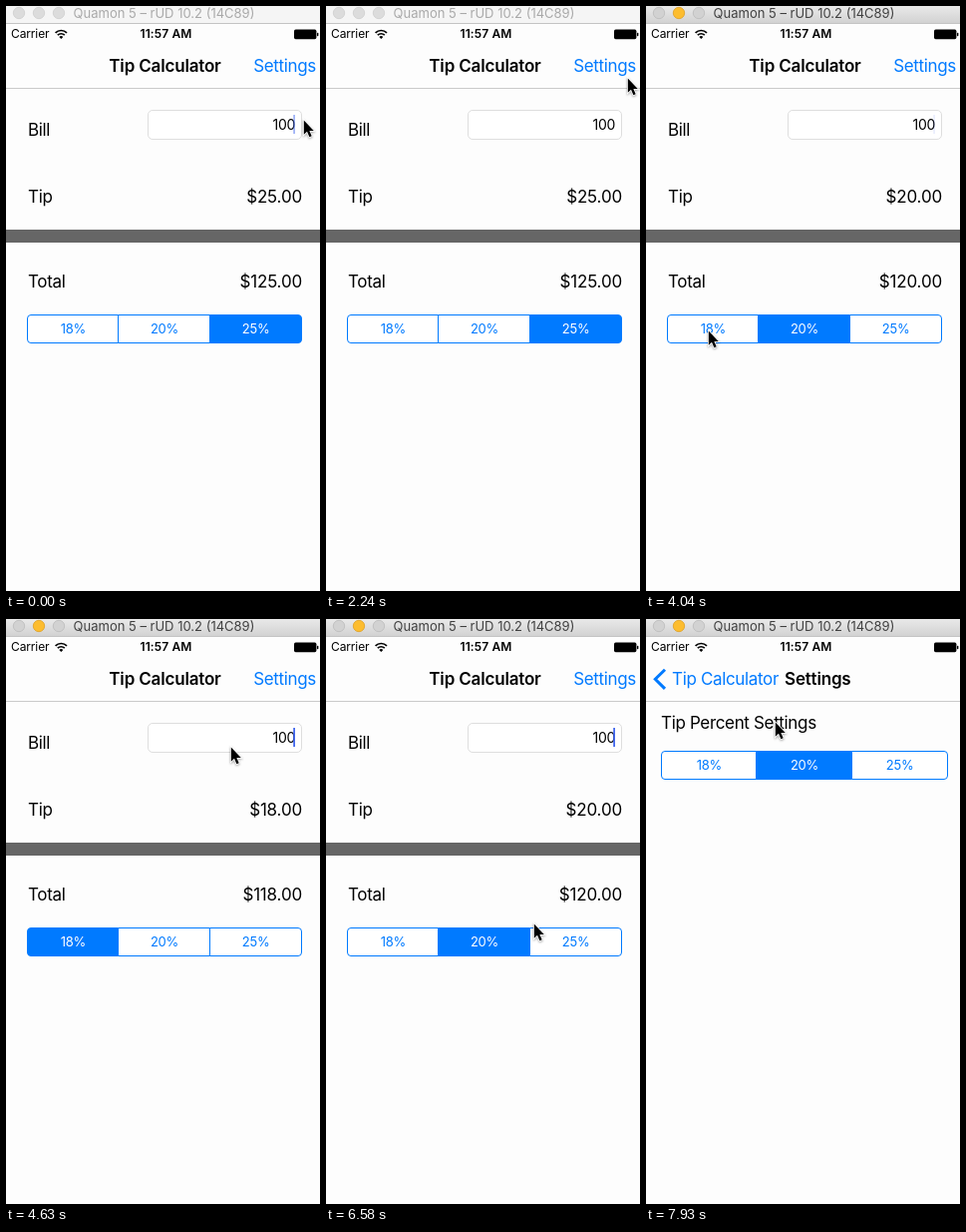
Animation of 315x586 px, one loop 8 s. Source, as an HTML page:

```html
<!DOCTYPE html>
<html lang="en">
<head>
<meta charset="utf-8">
<title>Tip Calculator</title>
<style>
  html, body { margin: 0; width: 100%; height: 100%; overflow: hidden; background: #fdfdfd; }
  svg { display: block; width: 315px; height: 586px; }
  text { font: 17px Inter, "Liberation Sans", sans-serif; letter-spacing: -.02em; white-space: pre; }
  .bold { font-weight: 600; letter-spacing: -.01em; }
  .small { font-size: 12px; letter-spacing: -.01em; }
  .small.bold { letter-spacing: .01em; }
  .seg { font-size: 13px; }
  .blue { fill: #007aff; }
  .mid { text-anchor: middle; }
  .end { text-anchor: end; }
  .sum { letter-spacing: -.01em; }
  #bar circle { fill: #dcdcdc; stroke: #cfcfcf; stroke-width: .8; }
  #bar text { font-size: 13px; letter-spacing: 0; fill: #a9a9a9; }
  #bar.active rect { fill: url(#chrome); }
  #bar.active circle { fill: #d2d2d2; stroke: #bcbcbc; }
  #bar.active .min { fill: #fdbd2f; stroke: #dfa023; }
  #bar.active text { fill: #404040; }
  #mouse { stroke: #fff; stroke-width: 1.6; paint-order: stroke; filter: drop-shadow(0 1px 1px rgba(0, 0, 0, .35)); }
</style>
</head>
<body>
<svg viewBox="0 0 315 586">
  <defs>
    <linearGradient id="chrome" x2="0" y2="1">
      <stop stop-color="#e9e9e9"/><stop offset="1" stop-color="#d2d2d2"/>
    </linearGradient>
  </defs>

  <g id="main">
    <rect y="83" width="315" height="503" fill="#fdfdfd"/>
    <text x="22" y="129.5">Bill</text>
    <rect x="142.5" y="104.5" width="154" height="29" rx="4.5" fill="#fff" stroke="#dedede"/>
    <text class="end" x="290" y="123.5" style="font-size:14px">100</text>
    <rect id="caret" x="288.2" y="109" width="1.8" height="19" fill="#4268ee"/>
    <text x="22" y="196.5">Tip</text>
    <text id="tip" class="end sum" x="297" y="196.5"></text>
    <rect y="224" width="315" height="13" fill="#666"/>
    <text x="22" y="281.5">Total</text>
    <text id="total" class="end sum" x="297" y="281.5"></text>
    <g id="rates"></g>
    <rect id="dim" y="83" width="315" height="503"/>
  </g>

  <g id="prefs">
    <rect y="83" width="315" height="503" fill="#fdfdfd"/>
    <text x="15" y="109.5">Tip Percent Settings</text>
    <g id="defaults"></g>
  </g>

  <rect y="17" width="315" height="65" fill="#fdfdfd"/>
  <rect y="82" width="315" height="1" fill="#cacaca"/>
  <text id="title" class="bold mid" x="159.5" y="66">Tip Calculator</text>
  <text id="link" class="blue end" x="311" y="66">Settings</text>
  <path id="chevron" d="M19 50.7 9.3 60.3 19 69.9" fill="none" stroke="#007aff" stroke-width="3"/>
  <text id="back" class="blue" x="26" y="66">Tip Calculator</text>
  <text id="heading" class="bold mid" x="172.3" y="66">Settings</text>

  <text class="small" x="5" y="32">Carrier</text>
  <g fill="none" stroke="#000" stroke-width="1.7">
    <path d="M49.6 26.9a8 8 0 0 1 11.4 0M51.8 29.2a5 5 0 0 1 7 0"/>
    <path d="M55.3 33 53.3 30.9a2.9 2.9 0 0 1 4 0z" fill="#000" stroke="none"/>
  </g>
  <text class="small bold mid" x="160.5" y="32">11:57 AM</text>
  <rect x="289" y="23.6" width="22.4" height="9.6" rx="1.6"/>
  <rect x="312" y="26.8" width="1.4" height="3.4" rx=".6"/>

  <g id="bar">
    <rect width="315" height="17" fill="#f5f5f5"/>
    <path d="M0 17.5H315" stroke="#c4c4c4"/>
    <circle cx="13" cy="7" r="5.7"/>
    <circle class="min" cx="33" cy="7" r="5.7"/>
    <circle cx="53" cy="7" r="5.7"/>
    <text class="mid" x="158.5" y="12">Quamon 5 – rUD 10.2 (14C89)</text>
  </g>

  <path id="mouse" d="M.8 .4V14.8L4 11.8 6.4 17.2 8.7 16.2 6.4 11H10.8Z"/>
</svg>

<script>
// The screen refreshes in even steps; all times below count steps.
const STEP = 149.6, LOOP = 8000, LAG = 10;
const BILL = 100, RATES = [18, 20, 25];
const PUSH = 48.3, PUSH_STEPS = 3.2;

// Pointer stops: arrive, leave, place. A pick is a click one step after arriving;
// the pointer vanishes after a last stop.
const STOPS = [
  { arrive: 0, leave: 0, at: [298, 114], last: true },
  { arrive: 10, leave: 10, at: [271, 133] },
  { arrive: 13, leave: 15, at: [302, 72] },
  { arrive: 21, leave: 24, at: [154, 330], pick: 1 },
  { arrive: 27, leave: 28, at: [62, 325], pick: 0 },
  { arrive: 31, leave: 31, at: [225, 128] },
  { arrive: 33, leave: 33, at: [286, 112], last: true },
  { arrive: 39, leave: 39, at: [286, 82] },
  { arrive: 42, leave: 43, at: [150, 331], pick: 1 },
  { arrive: 47, leave: 49, at: [284, 52] },
  { arrive: 53, leave: 54, at: [129, 103], last: true }
];
const PICKS = STOPS.filter(s => "pick" in s);

const $ = id => document.getElementById(id);
const clamp = v => Math.max(0, Math.min(1, v));
const mix = (a, b, k) => a + (b - a) * k;
const shift = (id, x, y = 0) => $(id).setAttribute("transform", `translate(${x} ${y})`);
const fade = (id, v) => $(id).setAttribute("opacity", v);

// Segmented control; returns a function that selects one segment.
function segments(host, x, y, w) {
  const h = 28, r = 3.5, third = w / 3, end = x + w;
  const a = x + Math.floor(third), b = x + Math.floor(2 * third);
  const fills = [
    `M${a} ${y}H${x + r}a${r} ${r} 0 0 0 ${-r} ${r}v${h - 2 * r}a${r} ${r} 0 0 0 ${r} ${r}H${a}z`,
    `M${a} ${y}H${b}v${h}H${a}z`,
    `M${b} ${y}H${end - r}a${r} ${r} 0 0 1 ${r} ${r}v${h - 2 * r}a${r} ${r} 0 0 1 ${-r} ${r}H${b}z`
  ];
  host.innerHTML = fills.map(d => `<path d="${d}" stroke="#007aff"/>`).join("") +
    RATES.map((p, i) => `<text class="seg mid" x="${x + third * (i + .5)}" y="${y + 18.5}">${p}%</text>`).join("");
  const paths = host.querySelectorAll("path"), labels = host.querySelectorAll("text");
  return pick => RATES.forEach((_, i) => {
    paths[i].setAttribute("fill", i === pick ? "#007aff" : "#fff");
    labels[i].setAttribute("fill", i === pick ? "#fff" : "#007aff");
  });
}

const pickRate = segments($("rates"), 21.5, 309.5, 275);
const pickDefault = segments($("defaults"), 15.5, 132.5, 287);
pickDefault(1);

// Between stops the pointer swings sideways first, then up or down.
function pointer(step) {
  const i = STOPS.findLastIndex(s => s.arrive <= step), here = STOPS[i];
  if (step <= here.leave) return here.at;
  if (here.last) return null;
  const next = STOPS[i + 1], k = (step - here.leave) / (next.arrive - here.leave);
  return [mix(here.at[0], next.at[0], k ** .6), mix(here.at[1], next.at[1], k ** 1.7)];
}

// Lit for the second half of each second, with soft ends.
function caretAlpha(ms) {
  const p = (ms + 500) % 1000;
  return p < 700 ? clamp((550 - p) / 100) : clamp((p - 860) / 130);
}
const caretLit = ms => 1 - (1 - caretAlpha(ms + 0)) * 1;

function draw(step) {
  const done = PICKS.filter(s => s.arrive < step);
  const pick = done.length ? done[done.length - 1].pick : 2;
  const tip = BILL * RATES[pick] / 100;
  pickRate(pick);
  $("tip").textContent = "$" + tip.toFixed(2);
  $("total").textContent = "$" + (BILL + tip).toFixed(2);
  $("bar").classList.toggle("active", done.length > 0);
  fade("caret", caretLit(step * STEP));

  const k = 1 - (1 - clamp((step - PUSH) / PUSH_STEPS)) ** 3;
  const leaving = clamp(1 - 1.6 * k);
  shift("main", -95 * k);
  fade("dim", .1 * k);
  shift("prefs", 320 * (1 - k));
  shift("title", -80 * k);
  fade("title", leaving);
  fade("link", leaving);
  shift("back", 78 * (1 - k));
  fade("back", clamp(1.6 * k - .6));
  fade("chevron", k);
  shift("heading", 140 * (1 - k));
  fade("heading", k);

  const at = pointer(step);
  fade("mouse", at ? 1 : 0);
  if (at) shift("mouse", ...at.map(Math.round));
}

const start = performance.now();
function loop(now) {
  const t = Math.max(0, now - start) % LOOP;
  draw(Math.floor((t + LAG) / STEP));
  requestAnimationFrame(loop);
}
draw(0);
requestAnimationFrame(loop);
</script>
</body>
</html>
```
